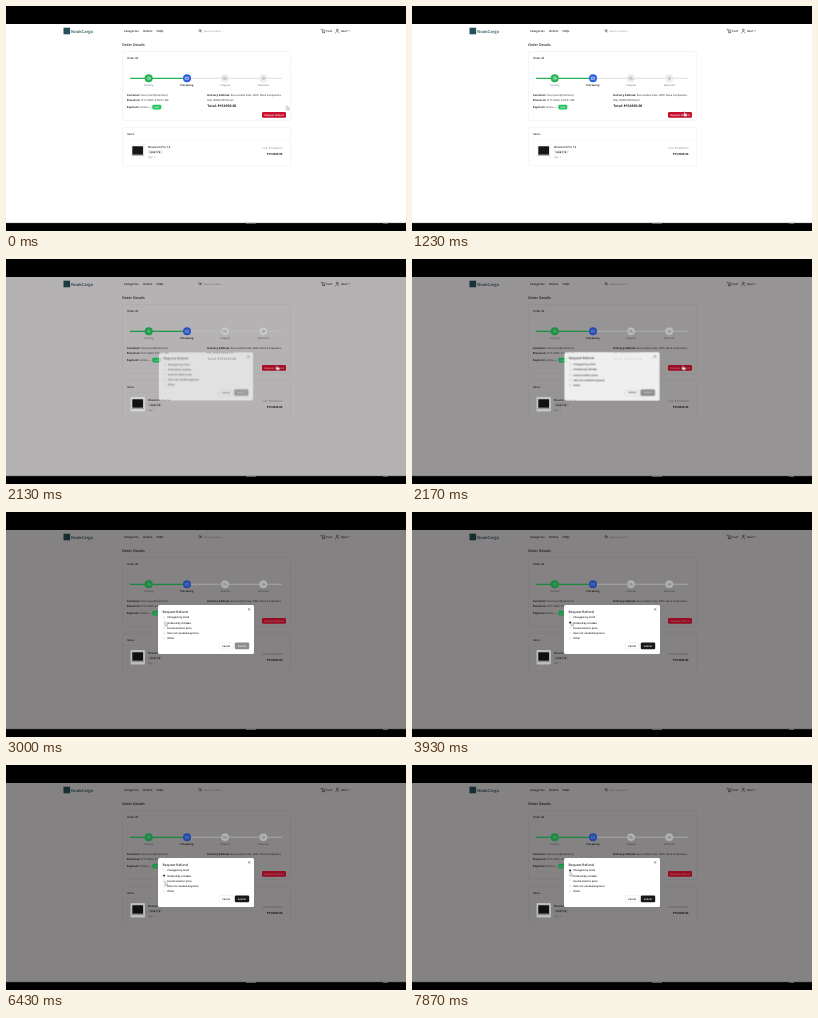
Animation, 400 px wide and 225 px high, one loop 8 s. Source, as an HTML page:

```html
<!DOCTYPE html>
<html lang="en">
<head>
<meta charset="utf-8">
<title>Refund dialog</title>
<style>
  html, body { margin: 0; width: 100%; height: 100%; overflow: hidden; background: #000; }
  svg { display: block; width: 100%; height: 100%; }
  text { font: 2.65px "Open Sans", "Noto Sans", sans-serif; fill: #222; text-rendering: geometricPrecision; }
  .b { font-weight: 700; }
  .m { font-weight: 600; }
  .gray { fill: #858585; }
  .end { text-anchor: end; }
  .mid { text-anchor: middle; }
  .white { fill: #fff; }
  .nav { font-size: 2.85px; font-weight: 600; }
  .step { font-size: 2.5px; text-anchor: middle; fill: #666; }
  .opt { font-size: 2.5px; font-weight: 600; fill: #111; }
  .card { fill: #fff; stroke: #ececec; stroke-width: .5; }
  .line { fill: none; stroke: #333; stroke-width: .45; stroke-linecap: round; stroke-linejoin: round; }

  .veil, .accent, .label, .dialog, .cursor, .arrow, .hand, .pick1, .pick2, .submit {
    animation: 8s linear infinite both;
  }
  .veil { animation-name: veil; }
  .accent { animation-name: dim; }
  .label { animation-name: fade; }
  .dialog { animation-name: open; transform-origin: 200px 117.5px; }
  .cursor { animation-name: move; }
  .arrow { animation-name: arrow; animation-timing-function: step-end; }
  .hand { animation-name: hand; animation-timing-function: step-end; }
  .pick1 { animation-name: pick1; animation-timing-function: step-end; }
  .pick2 { animation-name: pick2; animation-timing-function: step-end; }
  .submit { animation-name: enable; }

  @keyframes veil {
    0% { opacity: 0; }
    25.75% { opacity: 0; animation-timing-function: ease; }
    28.25%, 100% { opacity: .5; }
  }
  @keyframes dim {
    0% { filter: brightness(1); }
    25.75% { filter: brightness(1); animation-timing-function: ease; }
    28.25%, 100% { filter: brightness(.75); }
  }
  @keyframes fade {
    0% { opacity: 1; }
    25.75% { opacity: 1; animation-timing-function: ease; }
    28.25%, 100% { opacity: .5; }
  }
  @keyframes open {
    0% { opacity: 0; transform: scale(.95); }
    25.75% { opacity: 0; transform: scale(.95); animation-timing-function: ease; }
    28.25%, 100% { opacity: 1; transform: none; }
  }
  @keyframes move {
    0% { transform: translate(280.5px, 99.5px); animation-timing-function: ease-in-out; }
    10.4%, 15.4% { transform: translate(272px, 105.5px); animation-timing-function: ease-in-out; }
    21%, 30.6% { transform: translate(270.5px, 106.3px); animation-timing-function: ease-in-out; }
    36.9%, 52.5% { transform: translate(159px, 109.7px); animation-timing-function: ease-in-out; }
    58.1% { transform: translate(159.3px, 114.6px); animation-timing-function: ease-in-out; }
    66%, 80.2% { transform: translate(158.5px, 116.2px); animation-timing-function: ease-in-out; }
    83.8%, 85.8% { transform: translate(230.5px, 131.2px); animation-timing-function: ease-in-out; }
    91.5% { transform: translate(152.3px, 100.3px); animation-timing-function: ease-in-out; }
    95.4%, 100% { transform: translate(157.9px, 106.8px); }
  }
  @keyframes arrow { 0% { opacity: 1; } 9% { opacity: 0; } 31.3% { opacity: 1; } 83% { opacity: 0; } 86.5%, 100% { opacity: 1; } }
  @keyframes hand { 0% { opacity: 0; } 9% { opacity: 1; } 31.3% { opacity: 0; } 83% { opacity: 1; } 86.5%, 100% { opacity: 0; } }
  @keyframes pick1 { 0% { opacity: 0; } 98.37%, 100% { opacity: 1; } }
  @keyframes pick2 { 0% { opacity: 0; } 45% { opacity: 1; } 98.37%, 100% { opacity: 0; } }
  @keyframes enable { 0%, 45% { fill: #8c8c8d; } 46.9%, 100% { fill: #18181b; } }
</style>
</head>
<body>
<svg viewBox="0 0 400 225">
  <rect width="400" height="225"/>
  <rect y="18" width="400" height="199" fill="#fff"/>

  <!-- Top bar -->
  <rect x="57.5" y="21.7" width="6.6" height="6.6" fill="#24525a"/>
  <text class="m" x="65" y="26.6" style="font-size:4.1px;fill:#24525a">NookCargo</text>
  <text class="nav" x="118" y="26">Categories</text>
  <text class="nav" x="137" y="26">Orders</text>
  <text class="nav" x="150.5" y="26">FAQs</text>
  <text class="nav" x="320.3" y="26">Cart</text>
  <text class="nav" x="334.7" y="26">User</text>
  <text class="gray" x="197.5" y="25.8" style="font-size:2.35px">Search products...</text>
  <g class="line">
    <circle cx="193.8" cy="24.6" r="1.1"/>
    <path d="M194.7 25.5l.9.9M315 23.2h.8l.7 2.5h2.2l.5-1.8h-3.2M341.9 24.5l.8.8.8-.8"/>
    <circle cx="316.8" cy="26.7" r=".25"/><circle cx="318.4" cy="26.7" r=".25"/>
    <circle cx="331.2" cy="24" r=".95"/>
    <path d="M329.5 27c0-2.2 3.4-2.2 3.4 0"/>
  </g>

  <!-- Order -->
  <text x="116" y="40" class="m" style="font-size:3.55px">Order Details</text>
  <rect class="card" x="116.5" y="45.5" width="168" height="69" rx="1.5"/>
  <path d="M117 60h167" stroke="#f5f5f5" stroke-width=".5"/>
  <text class="m" x="121" y="53.2">Order #3</text>
  <text class="step" x="142.7" y="80.2">Pending</text>
  <text class="step b" x="180.8" y="80.2" style="fill:#222">Processing</text>
  <text class="step" x="219.1" y="80.2">Shipped</text>
  <text class="step" x="257.2" y="80.2">Delivered</text>

  <text x="120.8" y="90"><tspan class="b">Customer:</tspan> User (user@mail.test)</text>
  <text x="120.8" y="95.3"><tspan class="b">Placed on:</tspan> 9/11/2025, 4:06:01 AM</text>
  <text x="120.8" y="101.5"><tspan class="b">Payment:</tspan> online —</text>
  <text x="201.3" y="90"><tspan class="b">Delivery Address:</tspan> Rua Lamberinda, 2000, Nova Campanela,</text>
  <text x="201.3" y="94.6">MG, 00000-000 Brazil</text>
  <text class="b" x="201.3" y="100.8" style="font-size:3.45px">Total: ₱154990.00</text>

  <!-- Items -->
  <rect class="card" x="116.5" y="121.5" width="168" height="38.5" rx="1.5"/>
  <path d="M117 133.5h167" stroke="#f5f5f5" stroke-width=".5"/>
  <text class="m" x="121" y="129">Items</text>
  <text class="m" x="142" y="142" style="font-size:2.85px">Dravoom Pro 14</text>
  <rect x="141.8" y="143.8" width="15" height="4.2" rx="1" fill="#f1f1f1"/>
  <text class="m" x="143.3" y="146.9" style="font-size:2.4px">16GB 1TB</text>
  <text class="gray" x="142" y="151.8" style="font-size:2.5px">Qty: 1</text>
  <text class="gray end" x="276.5" y="143.4" style="font-size:2.55px">Unit: ₱154990.00</text>
  <text class="b end" x="276.5" y="148.8" style="font-size:2.85px">₱154990.00</text>

  <rect class="veil" y="18" width="400" height="199" fill="#0a0609"/>
  <path d="M0 217.2h400" stroke="#3c3c3c" stroke-width=".5"/>
  <path d="M240 217.3h10M377 217.3h5" stroke="#888" stroke-width=".8"/>

  <!-- Parts that stay brighter than the page under the veil -->
  <g class="accent">
    <path d="M181 72.3H276" stroke="#ddd" stroke-width="1.1"/>
    <g fill="#f0f0f0" stroke="#ddd" stroke-width=".4">
      <circle cx="219" cy="72.3" r="3.8"/><circle cx="257.3" cy="72.3" r="3.8"/>
    </g>
    <g class="line" style="stroke:#999">
      <path d="M217.3 71.2h2v2h-2zM219.3 71.8h.9l.6.7v.7h-1.5"/>
      <circle cx="257.3" cy="72.3" r="1.3"/><path d="M256.7 72.3l.5.5.8-.9"/>
    </g>
    <path d="M124 72.3h54" stroke="#22b455" stroke-width="1.2"/>
    <circle cx="142.7" cy="72.3" r="4" fill="#22b455"/>
    <circle cx="181" cy="72.3" r="4" fill="#2f5fe0"/>
    <rect x="146.3" y="98.7" width="9" height="4.8" rx="1.4" fill="#22c55e"/>
    <rect x="256" y="106" width="24" height="5.8" rx="1.2" fill="#c8102e"/>
    <rect x="124.5" y="138" width="14.5" height="14.5" rx="1" fill="#fafafa"/>
    <rect x="126.3" y="140.3" width="10.8" height="8.4" rx=".4" fill="#161616"/>
    <path d="M125.6 149.3h12.2" stroke="#999" stroke-width=".8"/>
    <g class="label">
      <g class="line" style="stroke:#fff">
        <circle cx="142.7" cy="72.3" r="1.5"/><path d="M142.7 71.4v.9l.6.4"/>
        <path d="M179.6 71.2h2.8v2.3h-2.8zM179.6 72h2.8"/>
      </g>
      <text class="m mid white" x="150.8" y="101.9" style="font-size:2.3px">paid</text>
      <text class="m mid white" x="268" y="109.8" style="font-size:2.5px">Request Refund</text>
    </g>
  </g>

  <!-- Dialog -->
  <g class="dialog">
    <rect x="152" y="93" width="96" height="49" rx="1.5" fill="#fff"/>
    <text class="m" x="156.5" y="100.5" style="font-size:3.3px">Request Refund</text>
    <path class="line" d="M242.3 96.5l1.8 1.8m0-1.8l-1.8 1.8"/>
    <g fill="#fff" stroke="#c8c8c8" stroke-width=".3">
      <circle cx="158.1" cy="105.4" r="1.1"/>
      <circle cx="158.1" cy="110.6" r="1.1"/>
      <circle cx="158.1" cy="115.8" r="1.1"/>
      <circle cx="158.1" cy="121" r="1.1"/>
      <circle cx="158.1" cy="126.2" r="1.1"/>
    </g>
    <circle class="pick1" cx="158.1" cy="105.4" r=".95" fill="#18181b"/>
    <circle class="pick2" cx="158.1" cy="110.6" r=".95" fill="#18181b"/>
    <text class="opt" x="161.2" y="106.3">Changed my mind</text>
    <text class="opt" x="161.2" y="111.5">Ordered by mistake</text>
    <text class="opt" x="161.2" y="116.7">Found a better price</text>
    <text class="opt" x="161.2" y="121.9">Item not needed anymore</text>
    <text class="opt" x="161.2" y="127.1">Other</text>
    <rect x="213.2" y="130.7" width="14" height="6.3" rx="1.2" fill="#fff" stroke="#ddd" stroke-width=".4"/>
    <text class="opt mid" x="220.2" y="134.8">Cancel</text>
    <rect class="submit" x="228.8" y="130.5" width="14.4" height="6.7" rx="1.2"/>
    <text class="opt mid" x="236" y="134.8" style="fill:#fff">Submit</text>
  </g>

  <g class="cursor" fill="#fff" stroke="#333" stroke-width=".28" stroke-linejoin="round">
    <path class="arrow" d="M0 0v4.2l1-.9.7 1.5.7-.3-.7-1.5h1.3z"/>
    <path class="hand" d="M0 .4q.4-.6.8 0v1.5l1.9.5q.5.2.4.8l-.4 1.6H.3L-.9 2.9q0-.6.9-.1z"/>
  </g>
</svg>
</body>
</html>
```
